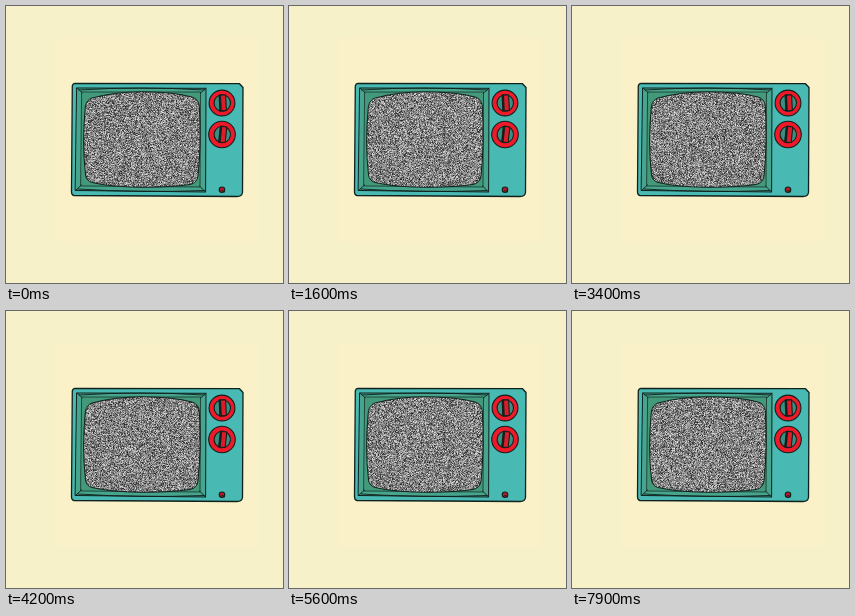
An HTML page with a canvas for the animation above (8 s loop, 277 by 277 pixels).

```html
<!DOCTYPE html>
<html lang="en">
<head>
<meta charset="utf-8">
<title>Television static</title>
<style>
html, body { margin: 0; width: 100%; height: 100%; overflow: hidden; background: #f7f1c9; }
svg, canvas { position: absolute; left: 0; top: 0; }
svg { width: 277px; height: 277px; }
canvas { left: 76px; top: 85px; }
</style>
</head>
<body>
<svg viewBox="0 0 277 277" stroke="#10201c" stroke-linejoin="round" stroke-linecap="round">
  <path d="M49 32H252V236H49Z" fill="#faf1c8" stroke="none"/>
  <path d="M69 77.300L233.500 77.700L237 81.500L236.500 186.500Q236 190.500 231 190.500L68 189.500Q65.500 189 65.500 186L66.300 80Q67 77.300 69 77.300Z" fill="#49b9b4" stroke-width="1.300"/>
  <path d="M71 82L200 82.300L199.600 186L69.500 184.500Z" fill="#46a58c" stroke-width="1"/>
  <path d="M76 86L194.500 86L194 181L75 180Z" fill="#429a7b" stroke-width=".7"/>
  <path d="M71 82L76 86.500M200 82.300L194.500 87M69.500 184.500L75.500 179M199.600 186L193.500 180M73 84Q134 80 198 84M72 183Q134 187 198 184.500" fill="none" stroke-width=".9"/>
  <g id="knobs" stroke-width="1.100">
    <circle cx="216" cy="97" r="12.900" fill="#ee1a2a"/>
    <circle cx="216" cy="128.500" r="13.300" fill="#ee1a2a"/>
    <g id="dial">
      <circle cx="216.300" cy="97" r="8.200" fill="#3b8f80"/>
      <g transform="rotate(-3 216.500 97)">
        <path d="M213.500 89H220V104.700H213.500Z" fill="#dc1b2b"/>
        <path d="M214.400 89.500V104.200" stroke-width="2"/>
      </g>
    </g>
    <use href="#dial" transform="translate(0 31.500) rotate(9 216.300 97)"/>
  </g>
  <circle cx="216" cy="183.700" r="2.700" fill="#c51c2c" stroke-width="1.200"/>
  <path d="M215.500 184L218.500 185.800" stroke-width="1"/>
</svg>
<canvas id="noise" width="120" height="98"></canvas>
<svg viewBox="0 0 277 277" fill="none" stroke="#10201c" stroke-width="1">
  <path id="screen" transform="translate(76 85)" d="M10 7Q32 1 60 .8Q92 1 110 6Q116.500 8 117.300 15Q119.500 52 116 85Q115 92 108 93.500Q88 96.300 60 96.300Q29 96 10 91.500Q4.500 90 3.500 84Q-.2 52 3.300 16Q4.500 8.800 10 7Z"/>
</svg>
<script>
const STEP = 100, STEPS = 20;
const canvas = document.getElementById('noise');
const ctx = canvas.getContext('2d');
const image = ctx.createImageData(canvas.width, canvas.height);
const pixels = new Uint32Array(image.data.buffer);
let shown = -1;

const outline = document.getElementById('screen').getAttribute('d');
canvas.style.clipPath = `path("${outline}")`;

function random(seed) {
  return () => {
    seed = seed + 0x6d2b79f5 | 0;
    let n = Math.imul(seed ^ seed >>> 15, seed | 1);
    n ^= n + Math.imul(n ^ n >>> 7, n | 61);
    return ((n ^ n >>> 14) >>> 0) / 4294967296;
  };
}

function drawStatic(step) {
  const rand = random(step * 7919 + 17);
  for (let i = 0; i < pixels.length; i++) {
    // Two samples per pixel soften the grain.
    const gray = Math.round(25 + 105 * (rand() + rand()));
    pixels[i] = 0xff000000 | gray * 0x010101;
  }
  ctx.putImageData(image, 0, 0);
}

function frame() {
  const step = Math.floor(performance.now() / STEP) % STEPS;
  if (step !== shown) drawStatic(shown = step);
  requestAnimationFrame(frame);
}
frame();
</script>
</body>
</html>
```
